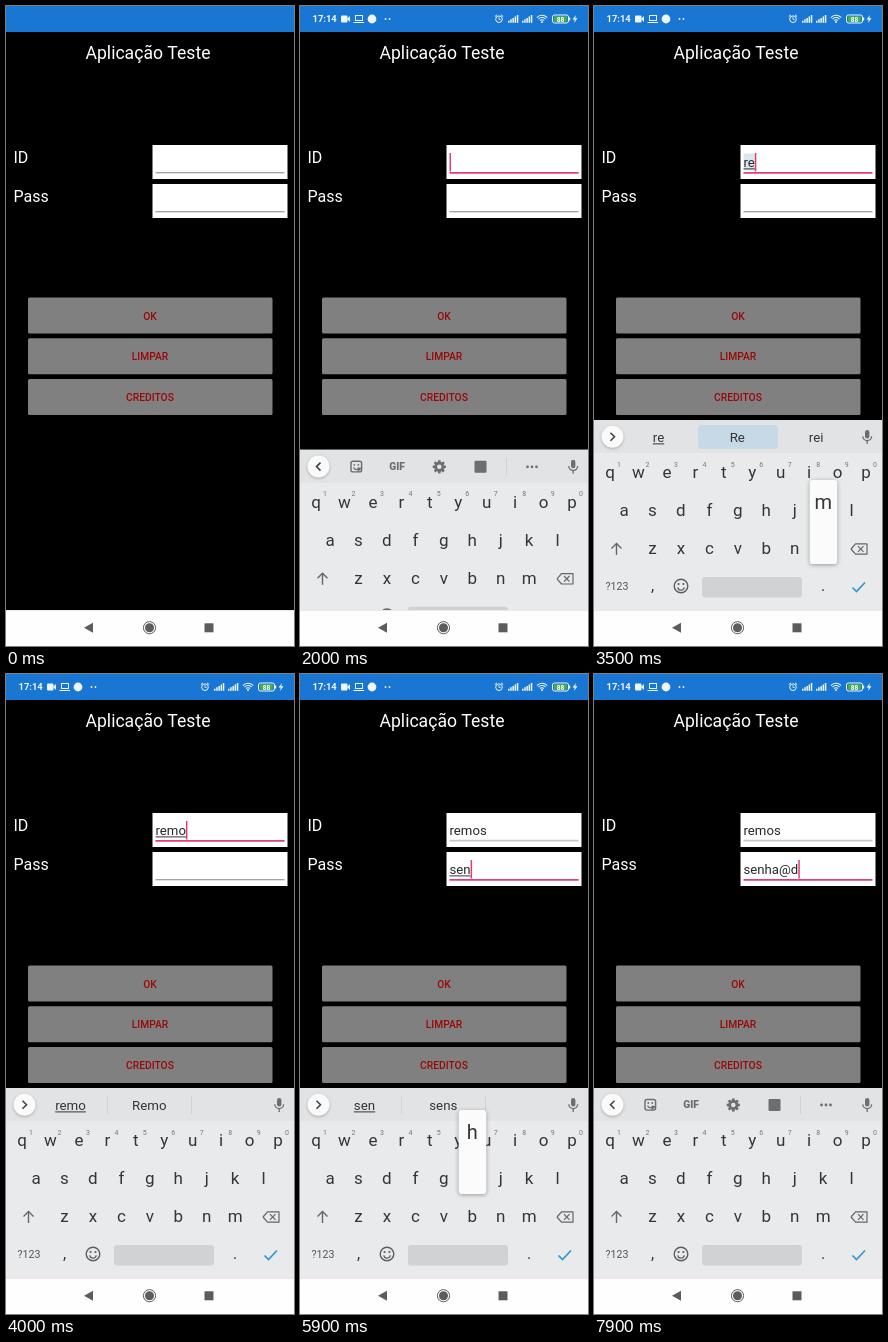
An HTML page with a canvas for the animation above (8000 ms loop, 288x640 px).

```html
<!DOCTYPE html>
<html lang="pt">
<head>
<meta charset="utf-8">
<title>Aplicação Teste</title>
<style>
html, body { margin: 0; width: 288px; height: 640px; overflow: hidden; background: #000; }
canvas { display: block; width: 288px; height: 640px; }
</style>
</head>
<body>
<canvas id="stage"></canvas>
<script>
const LOOP = 8000, W = 288, H = 640;
const PINK = '#e23d75', ICON = '#6c6e70', INK = '#333537';
const canvas = document.getElementById('stage');
const dpr = window.devicePixelRatio || 1;
canvas.width = W * dpr;
canvas.height = H * dpr;
const c = canvas.getContext('2d');

// Timeline: key commits as [time, character]
const idKeys = [[3150, 'r'], [3400, 'e'], [3600, 'm'], [3900, 'o'], [4150, 's']];
const passKeys = [[5350, 's'], [5550, 'e'], [5750, 'n'], [5920, 'h'], [6100, 'a'], [6900, '@'], [7550, 'd']];
const allKeys = idKeys.concat(passKeys);
const STATUS_AT = 400, ID_FOCUS = 1700, BOARD_AT = 1850, PASS_FOCUS = 4600, SYM_ON = 6350, SYM_OFF = 7200;

const LETTERS = ['qwertyuiop', 'asdfghjkl', 'zxcvbnm'];
const SYMBOLS = ['1234567890', '@#$_&-+()/', '*"\':;!?'];
const STEP = 28.45, ROW_Y = [467, 504, 542];

function rect(x, y, w, h, color, r = 0) {
  c.fillStyle = color;
  c.beginPath();
  c.roundRect(x, y, w, h, r);
  c.fill();
}

function disc(x, y, r, color) {
  c.fillStyle = color;
  c.beginPath();
  c.arc(x, y, r, 0, Math.PI * 2);
  c.fill();
}

function ring(x, y, r, color, lw = 1, from = 0, to = Math.PI * 2) {
  c.strokeStyle = color;
  c.lineWidth = lw;
  c.beginPath();
  c.arc(x, y, r, from, to);
  c.stroke();
}

function trace(pts) {
  c.beginPath();
  for (let i = 0; i < pts.length; i += 2) c.lineTo(pts[i], pts[i + 1]);
}

function line(color, lw, ...pts) {
  c.strokeStyle = color;
  c.lineWidth = lw;
  trace(pts);
  c.stroke();
}

function poly(color, ...pts) {
  c.fillStyle = color;
  trace(pts);
  c.fill();
}

function text(s, x, y, size, color, align = 'center', weight = 400) {
  c.font = `${weight} ${size}px Roboto, sans-serif`;
  c.textAlign = align;
  c.fillStyle = color;
  c.fillText(s, x, y);
  return c.measureText(s).width;
}

function shadow(blur, y, alpha) {
  c.shadowColor = `rgba(0,0,0,${alpha})`;
  c.shadowBlur = blur * dpr;
  c.shadowOffsetY = y * dpr;
}

const typed = (keys, t) => keys.filter(k => k[0] <= t).map(k => k[1]).join('');

function caretOn(t) {
  const marks = [ID_FOCUS, PASS_FOCUS, ...allKeys.map(k => k[0])].filter(m => m <= t);
  return (t - Math.max(...marks)) % 1000 < 500;
}

function statusBar(t) {
  rect(0, 0, W, 26, '#1976d2');
  const a = Math.min(1, Math.max(0, (t - STATUS_AT + 100) / 200));
  if (!a) return;
  const w = '#eef5fc';
  c.save();
  c.globalAlpha = a;
  text('17:14', 12.5, 16.3, 9.4, w, 'left', 700);
  rect(41, 9.5, 6.5, 7, w, 1);
  poly(w, 47, 13, 50, 10, 50, 16);
  c.strokeStyle = w;
  c.lineWidth = 1;
  c.strokeRect(55.5, 9.5, 7, 5);
  line(w, 1, 53.5, 16.5, 64, 16.5);
  disc(72, 13, 4.4, w);
  disc(85.5, 13, 0.9, w);
  disc(89.5, 13, 0.9, w);
  ring(199, 13.2, 3.3, w);
  line(w, 0.8, 199, 11, 199, 13.5, 200.7, 13.5);
  line(w, 1, 194.8, 10.6, 197, 8.8);
  line(w, 1, 201, 8.8, 203.2, 10.6);
  for (const x of [208, 222])
    for (let i = 0; i < 5; i++) rect(x + i * 2.2, 14.8 - i * 1.45, 1.5, 2 + i * 1.45, w);
  for (const r of [2.6, 4.8, 7]) ring(242, 16.3, r, w, 1.1, -Math.PI * 0.76, -Math.PI * 0.24);
  disc(242, 16, 1, w);
  c.strokeStyle = w;
  c.lineWidth = 1;
  c.beginPath();
  c.roundRect(252.5, 9, 16, 8, 2);
  c.stroke();
  rect(254, 10.2, 13, 5.6, '#43b04c', 1);
  rect(269, 11.5, 1.2, 3, w);
  text('88', 260.5, 15.6, 6.6, '#fff', 'center', 700);
  poly(w, 276, 9, 272.5, 13.6, 274.8, 13.6, 274, 17, 277.5, 12.3, 275.2, 12.3);
  c.restore();
}

function field(y, value, focused, left, composing, marked, caret) {
  rect(146.5, y, 135, 34, '#fff');
  if (focused) rect(149.5, y + 27.1, 129, 1.7, PINK);
  else if (left) rect(149.5, y + 26.8, 129, 1.8, '#c6c6c6');
  else rect(149.5, y + 27.2, 129, 1, '#858585');
  c.font = '400 13.2px Roboto, sans-serif';
  const w = c.measureText(value).width;
  if (marked) rect(149.5, y + 8.5, w, 17, '#dce6ee');
  text(value, 149.5, y + 22, 13.2, '#26282a', 'left');
  if (composing && value) rect(149.5, y + 23.4, w, 1, '#333');
  if (focused && caret) rect(149.5 + w, y + 8, 1.5, 18.5, PINK);
}

function form(t) {
  text('Aplicação Teste', 142, 53, 17.6, '#fff');
  text('ID', 7.5, 157, 16, '#fff', 'left');
  text('Pass', 7.5, 196, 16, '#fff', 'left');
  const id = typed(idKeys, t), pass = typed(passKeys, t);
  const onPass = t >= PASS_FOCUS, onId = t >= ID_FOCUS && !onPass;
  const caret = caretOn(t);
  field(139, id, onId, onPass, onId, onId && id.length === 2, caret);
  field(178, pass, onPass, false, !pass.includes('@'), false, caret);
  ['OK', 'LIMPAR', 'CREDITOS'].forEach((label, i) => {
    const y = 291.5 + i * 40.7;
    rect(22, y, 244.5, 36, '#808080', 1.5);
    text(label, 144, y + 22.2, 10.3, '#990808', 'center', 500);
  });
}

function mic() {
  rect(271, 424, 4.4, 8.4, ICON, 2.2);
  ring(273.2, 430.3, 4.4, ICON, 1.3, 0, Math.PI);
  line(ICON, 1.3, 273.2, 434.7, 273.2, 438);
}

function chevron(dir) {
  c.save();
  shadow(3, 1, 0.25);
  disc(18.5, 430.8, 11, '#fafafa');
  c.restore();
  line('#444', 1.6, 18.5 - dir * 2, 426.8, 18.5 + dir * 2, 430.8, 18.5 - dir * 2, 434.8);
}

function toolbar() {
  chevron(-1);
  c.strokeStyle = ICON;
  c.lineWidth = 1.4;
  c.beginPath();
  c.roundRect(51, 425.5, 10.6, 10.6, 2);
  c.stroke();
  ring(56.3, 431, 2.7, ICON, 1.2, 0.2, Math.PI - 0.2);
  disc(54.3, 429, 0.9, ICON);
  disc(58.3, 429, 0.9, ICON);
  poly(ICON, 57.5, 436.8, 62.3, 432, 57.5, 432);
  text('GIF', 97, 434.2, 10.2, ICON, 'center', 900);
  for (let i = 0; i < 8; i++) {
    const a = i * Math.PI / 4, x = Math.cos(a), y = Math.sin(a);
    line(ICON, 2.6, 139.3 + x * 3, 431 + y * 3, 139.3 + x * 6.6, 431 + y * 6.6);
  }
  ring(139.3, 431, 3.7, ICON, 2.8);
  rect(174.5, 425, 12, 12, ICON, 1);
  rect(206, 422, 1, 18, '#d0d2d3');
  for (const x of [227.5, 232, 236.5]) disc(x, 431, 1.4, ICON);
}

function suggestions(word, onPass) {
  const cap = word[0].toUpperCase() + word.slice(1);
  const strong = !onPass && word.length <= 2;
  const words = onPass ? [word, word + 's', ''] : [word, cap, word.length === 2 ? 'rei' : ''];
  chevron(1);
  if (strong) rect(104, 419, 80, 24, '#c6d9e6', 4);
  else for (const x of [101, 185]) rect(x, 422, 1, 18, '#d0d2d3');
  words.forEach((s, i) => {
    const x = 64.5 + i * 78.8;
    const w = text(s, x, 436, 13.3, INK);
    if (!i) rect(x - w / 2, 437.4, w, 1, INK);
  });
}

function keyPos(ch) {
  for (const rows of [LETTERS, SYMBOLS])
    for (let r = 0; r < 3; r++) {
      const i = rows[r].indexOf(ch);
      if (i >= 0) return [keyX(rows, r, i), ROW_Y[r]];
    }
}

function keyX(rows, r, i) {
  const start = r === 2 ? 58.5 : rows[r].length === 9 ? 30 : 16;
  return start + i * STEP;
}

function bottomKeys(sym) {
  text(sym ? 'ABC' : '?123', 23, 584, 10.6, '#555');
  text(',', 58.5, 585, 16, INK);
  if (sym) {
    text('1 2', 87, 578.5, 8.6, '#555', 'center', 500);
    text('3 4', 87, 588.5, 8.6, '#555', 'center', 500);
  } else {
    ring(87, 580, 6.8, '#5c5e60', 1.4);
    disc(84.6, 578, 1.1, '#5c5e60');
    disc(89.4, 578, 1.1, '#5c5e60');
    ring(87, 580.8, 3.3, '#5c5e60', 1.3, 0.15, Math.PI - 0.15);
  }
  rect(108, 571, 100, 20.5, '#d0d2d3', 3);
  text('.', 229, 585, 16, INK);
  line('#3496d3', 1.7, 258.5, 581.5, 262.5, 585.5, 271, 576.5);
}

function keys(sym) {
  const rows = sym ? SYMBOLS : LETTERS;
  rows.forEach((row, r) => [...row].forEach((ch, i) => {
    const x = keyX(rows, r, i);
    const base = ROW_Y[r] + (sym ? 7 : r ? 6 : 5);
    text(ch, x, base, 17, INK);
    if (!sym && r === 0) text((i + 1) % 10, x + 9, 460.5, 7, '#777');
  }));
  if (sym) text('=\\<', 23, 546.5, 10.6, '#555', 'center', 500);
  else {
    line('#666', 1.4, 22.5, 549, 22.5, 537.5);
    line('#666', 1.4, 17.5, 542.5, 22.5, 537.5, 27.5, 542.5);
  }
  c.lineJoin = 'round';
  line('#666', 1.2, 257, 543, 261.5, 537.8, 273, 537.8, 273, 548.2, 261.5, 548.2, 257, 543);
  line('#666', 1.2, 264, 540.2, 269.5, 545.8);
  line('#666', 1.2, 269.5, 540.2, 264, 545.8);
  c.lineJoin = 'miter';
  bottomKeys(sym);
}

function popup(t) {
  const hit = allKeys.find(k => t >= k[0] - 130 && t < k[0]);
  if (!hit) return;
  const [x, y] = keyPos(hit[1]);
  c.save();
  shadow(4, 1, 0.35);
  rect(x - 13.5, y - 68, 27.5, 84, '#fbfbfb', 3);
  c.restore();
  text(hit[1], x, y - 39, 20, INK);
}

function keyboard(t) {
  if (t < BOARD_AT) return;
  const p = Math.min(1, (t - BOARD_AT) / 250);
  c.save();
  c.beginPath();
  c.rect(0, 0, W, 604);
  c.clip();
  c.translate(0, 190 * (1 - p) ** 2);
  rect(0, 414, W, 190, '#e9eaeb');
  rect(0, 414, W, 33, '#e1e3e4');
  const onPass = t >= PASS_FOCUS;
  const word = typed(onPass ? passKeys : idKeys, t);
  if (word && !word.includes('@')) suggestions(word, onPass);
  else toolbar();
  mic();
  keys(t >= SYM_ON && t < SYM_OFF);
  popup(t);
  c.restore();
}

function navBar() {
  rect(0, 604, W, 36, '#fefefe');
  rect(0, 604, W, 1, '#f3e4e8');
  poly('#5c5c5c', 78, 621.7, 87, 616.7, 87, 626.7);
  ring(143.5, 621.7, 6.1, '#5c5c5c', 1);
  disc(143.5, 621.7, 4.5, '#5c5c5c');
  rect(198.5, 617.3, 9, 9, '#5c5c5c');
}

function draw(t) {
  c.setTransform(dpr, 0, 0, dpr, 0, 0);
  rect(0, 0, W, H, '#000');
  statusBar(t);
  form(t);
  keyboard(t);
  navBar();
}

const start = performance.now();
function frame() {
  draw((performance.now() - start) % LOOP);
  requestAnimationFrame(frame);
}
frame();
</script>
</body>
</html>
```
